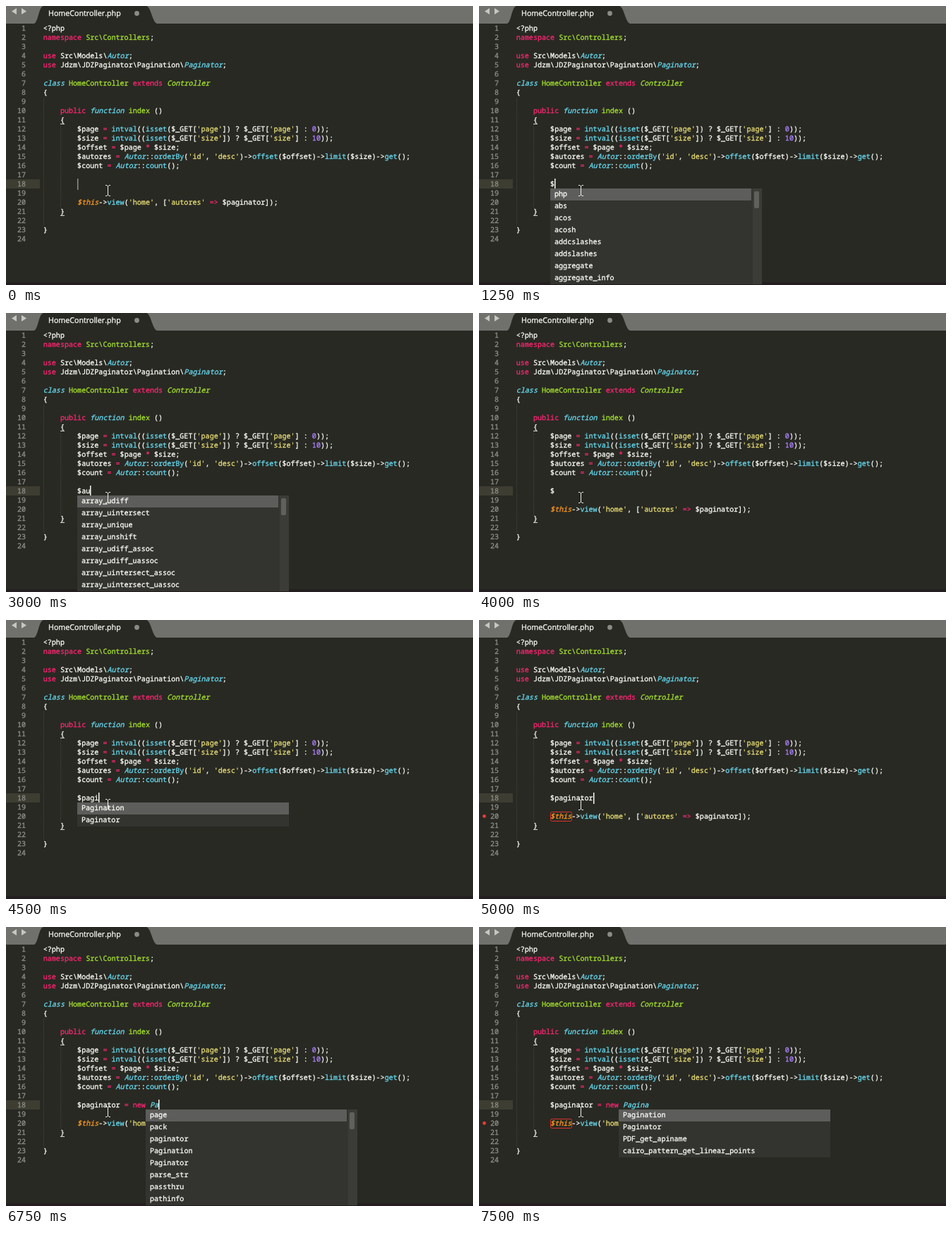
Recreate the animation shown at these times as an HTML page. Size 662 px wide and 396 px high, loop 8 s.

```html
<!DOCTYPE html>
<html lang="en">
<head>
<meta charset="utf-8">
<title>Code editor</title>
<style>
  html, body { margin: 0; width: 100%; height: 100%; overflow: hidden; background: #282923; }
  svg { display: block; width: 662px; height: 396px; }
  text {
    font: 10.08px "Noto Sans Mono", monospace; text-rendering: geometricPrecision; white-space: pre;
    color: #fcfcf7; fill: currentColor; stroke: currentColor; stroke-width: .3px;
  }
  .title { font: 10.7px "Open Sans", sans-serif; }
  .number { color: #8f908a; text-anchor: end; }
  .key { color: #f92672; }
  .kind, .type { color: #66d9ef; font-style: italic; }
  .call { color: #66d9ef; }
  .name { color: #a6e22e; }
  .base { color: #a6e22e; font-style: italic; }
  .string { color: #e6db74; }
  .digit { color: #ae81ff; }
  .self { color: #fd971f; font-style: italic; }
</style>
</head>
<body>
<svg id="stage" viewBox="0 0 662 396"></svg>
<script>
const LOOP = 8000;
const ADVANCE = 6.05, LINE = 13, LEFT = 52.7, BASELINE = 34.8;
const EDIT_ROW = 18, INDENT = 8;
const POPUP = { y: 259, width: 300, row: 17 };

const code = String.raw`<?php
namespace Src\Controllers;

use Src\Models\Autor;
use Jdzm\JDZPaginator\Pagination\Paginator;

class HomeController extends Controller
{

    public function index ()
    {
        $page = intval((isset($_GET['page']) ? $_GET['page'] : 0));
        $size = intval((isset($_GET['size']) ? $_GET['size'] : 10));
        $offset = $page * $size;
        $autores = Autor::orderBy('id', 'desc')->offset($offset)->limit($size)->get();
        $count = Autor::count();



        $this->view('home', ['autores' => $paginator]);
    }

}
`.split('\n');

const syntax = new RegExp([
  /(?<string>'[^']*')/,
  /(?<self>\$this)/,
  /(?<variable>\$\w*)/,
  /(?<key>\b(?:namespace|use|extends|public|new)\b|=>|[=*])/,
  /(?<kind>\b(?:class|function)\b)/,
  /(?<name>\b(?:HomeController|index|Src\\Controllers)\b)/,
  /(?<base>\bController\b)/,
  /(?<type>(?<=new )\w+|\b(?:Autor|Paginator)\b)/,
  /(?<call>\w+(?=\())/,
  /(?<digit>\b\d+)/,
  /(?<plain>\w+|\S)/
].map(rule => rule.source).join('|'), 'g');

const forDollar = ['php', 'abs', 'acos', 'acosh', 'addcslashes', 'addslashes', 'aggregate', 'aggregate_info'];
const forA = ['as', ...forDollar.slice(1)];
const forAu = ['udiff', 'uintersect', 'unique', 'unshift', 'udiff_assoc', 'udiff_uassoc',
  'uintersect_assoc', 'uintersect_uassoc'].map(end => 'array_' + end);
const forP = ['php', 'page', 'pack', 'paginator', 'Pagination', 'Paginator', 'parse_str', 'passthru'];
const forPa = ['page', 'pack', 'paginator', 'Pagination', 'Paginator', 'parse_str', 'passthru', 'pathinfo'];
const forPag = ['page', 'Pagination', 'Paginator', 'PDF_get_apiname', 'cairo_pattern_get_linear_points'];
const forPagin = ['Pagination', 'Paginator'];
const forPagina = [...forPagin, 'PDF_get_apiname', 'cairo_pattern_get_linear_points'];

// time, typed text, caret opacity, suggestions, lint mark
const steps = [
  [0, '', .5],
  [250, '', 0],
  [750, '', 1],
  [1000, '$', 1],
  [1250, '$', 1, forDollar],
  [1750, '$', .5, forDollar],
  [2000, '$', 0, forDollar],
  [2250, '$', 1, forDollar],
  [2500, '$', .5, forDollar],
  [2750, '$a', 1, forA],
  [3000, '$au', 1, forAu],
  [3250, '$au', 1, forAu, true],
  [3500, '$au', .5, null, true],
  [3750, '$', 1, null, true],
  [4000, '$', 0],
  [4250, '$pa', 1],
  [4500, '$pagi', 1, forPagin],
  [4750, '$paginat', 1, forPagin],
  [5000, '$paginator', 1, null, true],
  [5250, '$paginator', .5, null, true],
  [5500, '$paginator ', 1, null, true],
  [5750, '$paginator =', 1, null, true],
  [6000, '$paginator = n', 1],
  [6250, '$paginator = new ', 1],
  [6500, '$paginator = new P', 1, forP],
  [6750, '$paginator = new Pa', 1, forPa],
  [7000, '$paginator = new Pag', 1, forPag],
  [7250, '$paginator = new Pagi', 1, forPagina],
  [7500, '$paginator = new Pagina', 0, forPagina, true]
];

const stage = document.getElementById('stage');

function add(parent, tag, attrs, content = '') {
  const node = document.createElementNS('http://www.w3.org/2000/svg', tag);
  for (const key in attrs) node.setAttribute(key, attrs[key]);
  node.textContent = content;
  return parent.appendChild(node);
}

const rect = (parent, x, y, width, height, fill, more) =>
  add(parent, 'rect', { x, y, width, height, fill, ...more });
const path = (parent, d, more) => add(parent, 'path', { d, ...more });
const label = (parent, x, y, content, name = '') =>
  add(parent, 'text', { x, y, class: name }, content);

const columnX = column => LEFT + column * ADVANCE;
const rowY = row => BASELINE + (row - 1) * LINE;

function drawCode(parent, source, row, column = 0) {
  for (const match of source.matchAll(syntax)) {
    const kind = Object.keys(match.groups).find(key => match.groups[key] !== undefined);
    label(parent, columnX(column + match.index), rowY(row), match[0], kind);
  }
}

function drawWindow() {
  rect(stage, 0, 0, 662, 396, '#282923');
  rect(stage, 0, 0, 662, 25, '#70716c');
  path(stage, 'M40 25C46 22 46 2 53 0H199C206 2 207 22 214 25Z', { fill: '#282923' });
  path(stage, 'M15 3V12L8 7.5ZM22 3V12L29 7.5Z', { fill: '#c6c7c3' });
  label(stage, 60, 14, 'HomeController.php', 'title');
  add(stage, 'circle', { cx: 185.5, cy: 10.5, r: 3.4, fill: '#8b8c86' });
  rect(stage, 0, 392, 662, 4, '#241e20');
  rect(stage, 0, 246, 48, 13, '#3e3d32');

  path(stage, 'M53.5 130V311M77.5 169V286', { stroke: '#45463f', 'stroke-dasharray': '1 1' });
  code.forEach((source, i) => {
    label(stage, 28, rowY(i + 1), i + 1, 'number');
    drawCode(stage, source, i + 1);
  });
  path(stage, 'M77 167.5H83M77 297.5H83', { stroke: '#d8d8d2' });
}

function drawLint(parent) {
  add(parent, 'circle', { cx: 7.5, cy: 278.5, r: 2.4, fill: '#ee3a35' });
  rect(parent, 101.5, 272.5, 30, 13, 'none', { rx: 2, stroke: '#d9342c' });
}

function drawPopup(parent, x, items) {
  const { y, width, row } = POPUP;
  const scrolls = items.length > 7;
  rect(parent, x, y, width, items.length * row, '#33342f');
  rect(parent, x, y, scrolls ? width - 15 : width, row, '#5d5e5b');
  items.forEach((item, i) => label(parent, x + 6, y + 11 + i * row, item));
  if (scrolls) {
    rect(parent, x + width - 13, y, 13, items.length * row, '#3b3c37');
    rect(parent, x + width - 11, y + 4, 7, 24, '#60615d', { rx: 2 });
  }
}

drawWindow();
const live = add(stage, 'g', {});
path(stage, 'M141 254.5H143L144.5 256L146 254.5H148M144.5 256V268M141 269.5H143L144.5 268L146 269.5H148',
  { fill: 'none', stroke: '#f2f2ee' });

function render([, typed, caret, items, lint]) {
  live.replaceChildren();
  if (lint) drawLint(live);
  drawCode(live, typed, EDIT_ROW, INDENT);
  rect(live, Math.round(columnX(INDENT + typed.length)), 245, 1.5, 16, '#f8f8f0', { opacity: caret });
  if (items) {
    const wordStart = typed.search(/\w+$/);
    const column = wordStart < 0 ? typed.length : wordStart;
    drawPopup(live, Math.round(columnX(INDENT + column)) - 6, items);
  }
}

let shown;
const start = performance.now();
function tick() {
  const time = (performance.now() - start) % LOOP;
  const step = steps.findLast(([at]) => at <= time);
  if (step !== shown) render(shown = step);
  requestAnimationFrame(tick);
}
tick();
</script>
</body>
</html>
```
